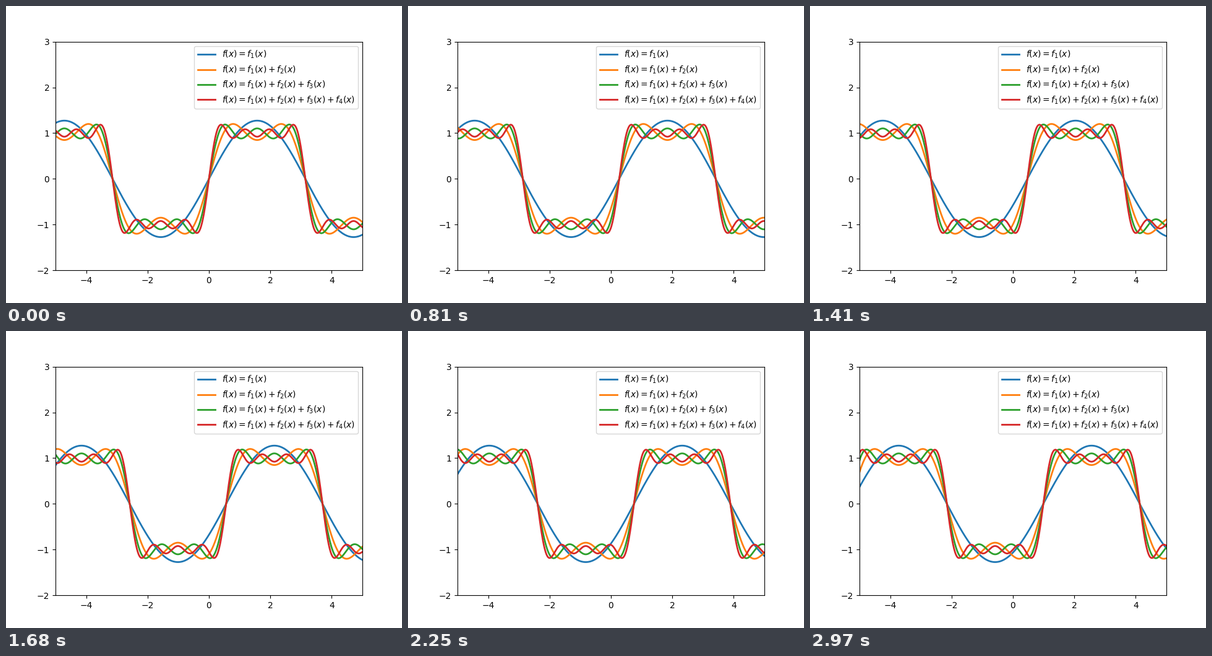
These frames come from a looping animation (640 px wide and 480 px high, 3 s). A matplotlib script:

```python
import numpy as np
import matplotlib.pyplot as plt
from matplotlib.animation import FuncAnimation

FRAMES = 100
INTERVAL = 30  # ms
SPEED = 0.01   # shift in x per frame

x = np.linspace(-5, 5, 1000)


def harmonic(n, x):
    """n-th term of the square wave's Fourier series."""
    k = 2 * n - 1
    return 4 / np.pi * np.sin(k * x) / k


def partial_sums(x):
    return np.cumsum([harmonic(n, x) for n in range(1, 5)], axis=0)


def label(count):
    terms = " + ".join(f"f_{n}(x)" for n in range(1, count + 1))
    return f"$f(x) = {terms}$"


fig, ax = plt.subplots(figsize=(6.4, 4.8), dpi=100)
ax.set_xlim(-5, 5)
ax.set_ylim(-2, 3)
lines = [ax.plot(x, y, lw=2, label=label(i))[0]
         for i, y in enumerate(partial_sums(x), start=1)]
ax.legend(loc="upper right")


def update(frame):
    for line, y in zip(lines, partial_sums(x - SPEED * frame)):
        line.set_ydata(y)
    return lines


anim = FuncAnimation(fig, update, frames=FRAMES, interval=INTERVAL,
                     repeat=True, repeat_delay=0, blit=False)

plt.show()
```
